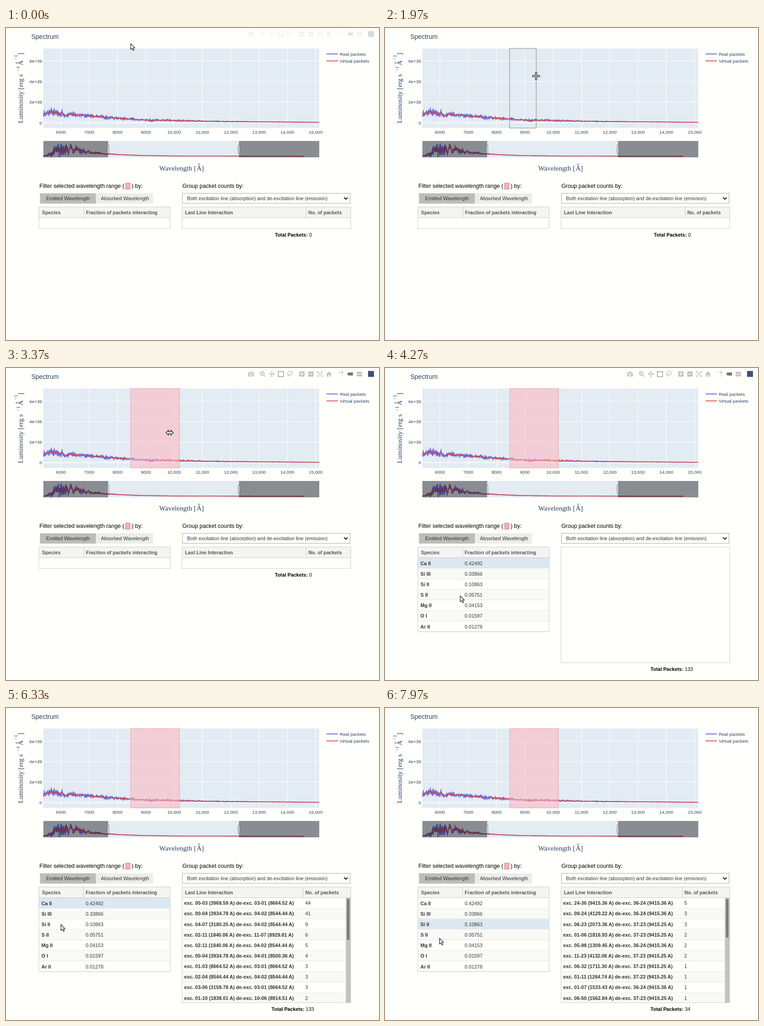
An HTML page for the animation above (8 s loop, 818 px wide and 685 px high).

```html
<!DOCTYPE html>
<html lang="en">
<head>
<meta charset="utf-8">
<title>Spectrum explorer</title>
<style>
  html, body { margin: 0; width: 100%; height: 100%; overflow: hidden; background: #fffffb; }
  svg { display: block; width: 818px; height: 685px; }
  text { font-family: "Liberation Sans", Arial, sans-serif; font-size: 10.75px; fill: #333; white-space: pre; }
  .plot text { font-size: 9.9px; fill: #2a3f5f; }
  .plot .serif { font-family: "Liberation Serif", "Times New Roman", serif; font-size: 15.2px; }
  .plot .sup { font-size: 11px; }
  .b { font-weight: bold; }
  .head { font-weight: bold; fill: #555; }
  .label { font-size: 12.4px; fill: #000; }
  .total { fill: #000; }
</style>
</head>
<body>
<svg viewBox="0 0 818 685" id="stage"></svg>
<script>
const LOOP = 8000;
const stage = document.getElementById('stage');

// ---------- helpers ----------
function el(name, attrs = {}, parent = stage) {
  const node = document.createElementNS('http://www.w3.org/2000/svg', name);
  for (const key in attrs) node.setAttribute(key, attrs[key]);
  parent.appendChild(node);
  return node;
}
const group = (parent = stage, attrs = {}) => el('g', attrs, parent);
const rect = (p, x, y, w, h, fill, more = {}) => el('rect', { x, y, width: w, height: h, fill, ...more }, p);
const path = (p, d, stroke, width = 1, more = {}) =>
  el('path', { d, stroke, 'stroke-width': width, fill: 'none', ...more }, p);
function text(p, x, y, content, cls = '', more = {}) {
  const node = el('text', { x, y, class: cls, ...more }, p);
  node.textContent = content;
  return node;
}
const show = (node, on) => node.setAttribute('display', on ? 'inline' : 'none');
const clamp = v => Math.max(0, Math.min(1, v));
const easeOut = p => 1 - Math.pow(1 - clamp(p), 2.3);
const smooth = p => p * p * (3 - 2 * p);

// Piecewise interpolation through [position, ...values] points.
function along(points, at, ease = p => p) {
  if (at <= points[0][0]) return points[0].slice(1);
  for (let i = 1; i < points.length; i++) {
    const a = points[i - 1], b = points[i];
    if (at <= b[0]) {
      const p = ease((at - a[0]) / (b[0] - a[0]));
      return a.slice(1).map((v, k) => v + (b[k + 1] - v) * p);
    }
  }
  return points[points.length - 1].slice(1);
}

function random(seed) {
  return () => {
    seed = (seed * 1664525 + 1013904223) % 4294967296;
    return seed / 4294967296;
  };
}

// ---------- spectrum plot ----------
const BLUE = '#6663da', RED = '#dc4a4a', PLOT_BG = '#e3ebf3';
const plot = group(stage, { class: 'plot' });
text(plot, 55.5, 24, 'Spectrum', '', { style: 'font-size:14px' });
rect(plot, 82, 45, 605, 174.5, PLOT_BG);

for (let i = 0; i < 10; i++) {
  const x = 120.5 + i * 62.06;
  path(plot, `M${x} 45V219.5`, '#fff');
  const name = 6 + i + (i < 4 ? '000' : ',000');
  text(plot, x, 232, name, '', { 'text-anchor': 'middle' });
}
function yAxis(zero, step) {
  const axis = group(plot);
  ['0', '2e+39', '4e+39', '6e+39'].forEach((name, i) => {
    const y = zero - i * step;
    path(axis, `M82 ${y}H687`, '#fff', i ? 1 : 1.7);
    text(axis, 79, y + 3.6, name, '', { 'text-anchor': 'end' });
  });
  return axis;
}
const axisBefore = yAxis(208, 45.2);
const axisAfter = yAxis(207.6, 44.9);

// Points hold position, level and noise height.
function trace(points, from, to, step, noise, seed, color, width) {
  const rnd = random(seed);
  let d = '';
  for (let x = from; x <= to; x += step) {
    const [y, amp] = along(points, x);
    const jitter = (rnd() + rnd() - 1) * amp * noise;
    d += (d ? 'L' : 'M') + x.toFixed(1) + ' ' + (y + jitter).toFixed(2);
  }
  path(plot, d, color, width, { 'stroke-linejoin': 'round' });
}
const spectrum = [
  [82, 188, 12], [92, 187, 12], [101, 183, 10], [108, 186, 12], [122, 187, 10], [130, 194, 7],
  [140, 189, 7], [160, 191, 6.5], [200, 194.5, 6], [244, 198, 5], [300, 202, 4], [340, 202.7, 4],
  [400, 204, 2.5], [480, 205.3, 1.5], [560, 206, 1], [687, 207, 0.6]
];
trace(spectrum, 82, 687, 0.6, 1, 7, BLUE, 1.5);
trace(spectrum, 82, 687, 1, 0.2, 21, RED, 1.7);

rect(plot, 82, 248, 605, 36, PLOT_BG);
const overview = [
  [82, 281.8, 0], [88, 280, 4], [98, 278, 6], [106, 271, 15], [113, 269, 17], [121, 269, 16],
  [127, 268, 14], [133, 264, 14], [137, 274, 8], [142, 256, 9], [147, 274, 6], [154, 264, 9],
  [161, 268, 8], [170, 270, 8], [176, 274, 5], [181, 271, 5], [190, 275, 4], [200, 273, 3],
  [209, 275.5, 2.5], [222, 277, 1.5], [232, 276.5, 1.5], [246, 278, 1], [300, 280, 0.6],
  [400, 281.2, 0.2], [654, 281.6, 0]
];
trace(overview, 82, 654, 0.5, 1.1, 5, BLUE, 1.5);
trace(overview, 82, 654, 0.8, 0.4, 11, RED, 1.6);
rect(plot, 82, 248, 142, 36, 'rgba(0,0,0,.4)');
rect(plot, 511, 248, 176, 36, 'rgba(0,0,0,.4)');
for (const x of [222.3, 509.3])
  rect(plot, x, 257, 3, 18.5, '#fff', { stroke: '#444', 'stroke-width': 0.9, rx: 0.8 });

text(plot, 336, 313, 'Wavelength [', 'serif');
text(plot, 418, 313, 'A', 'serif');
text(plot, 429, 313, ']', 'serif');
el('circle', { cx: 423.5, cy: 299.8, r: 1.7, stroke: '#2a3f5f', 'stroke-width': 0.8, fill: 'none' }, plot);

const yTitle = group(plot, { transform: 'translate(36.5 209) rotate(-90)' });
text(yTitle, 0, 0, 'Luminosity [erg s', 'serif');
text(yTitle, 113.5, -6.5, '−1', 'serif sup');
text(yTitle, 127, 0, 'A', 'serif');
text(yTitle, 138.5, -11.5, '−1', 'serif sup');
text(yTitle, 149.5, 0, ']', 'serif');
el('circle', { cx: 132.5, cy: -13.2, r: 1.7, stroke: '#2a3f5f', 'stroke-width': 0.8, fill: 'none' }, yTitle);

[['Real packets', BLUE, 57], ['Virtual packets', RED, 72.3]].forEach(([name, color, y]) => {
  path(plot, `M703 ${y}H728`, color, 1.8);
  text(plot, 732, y + 3.5, name);
});

const range = rect(plot, 273.5, 45, 107, 174.3, 'rgba(255,182,193,.56)', { stroke: '#e3a3ac', 'stroke-width': 0.9 });
const dragBase = rect(plot, 273.3, 44.8, 1, 174.9, 'none', { stroke: '#fff' });
const dragBox = rect(plot, 273.3, 44.8, 1, 174.9, 'none', { stroke: '#000', 'stroke-dasharray': '1.7 1.7' });

// ---------- toolbar ----------
const bar = group();
const ICON = '#c3c3c1', ACTIVE = '#747472';
path(bar, 'M531 10h3l1.5-2h4l1.5 2h2.500v8.500h-12.500z', 'none', 1, { fill: ICON });
el('circle', { cx: 537, cy: 14, r: 2.6, fill: ICON, stroke: '#fffffb', 'stroke-width': 1.3 }, bar);
el('circle', { cx: 562, cy: 12, r: 4.2, fill: 'none', stroke: ICON, 'stroke-width': 1.9 }, bar);
path(bar, 'M565 15l4 4M560 12h4M562 10v4', ICON, 1.7);
path(bar, 'M583 7.500v11.500M577.500 13.200h11.500M581 9.500l2-2 2 2M581 17l2 2 2-2M579.500 11l-2 2.200 2 2M587 11l2 2.200-2 2', ICON, 1.5);
rect(bar, 597.3, 7.8, 11.4, 11, 'none', { stroke: ACTIVE, 'stroke-width': 1.7, 'stroke-dasharray': '1.9 1.3' });
el('ellipse', { cx: 622.8, cy: 11.3, rx: 5.6, ry: 3.9, fill: 'none', stroke: ICON, 'stroke-width': 1.5, transform: 'rotate(-15 622.8 11.3)' }, bar);
path(bar, 'M618.500 14q-1 2 1 2.200t1 3', ICON, 1.3);
for (const x of [649, 668.7]) {
  rect(bar, x - 5.8, 7.5, 11.6, 11.5, ICON, { rx: 0.8 });
  path(bar, `M${x - 3.2} 13.200h6.400` + (x < 650 ? `M${x} 10v6.400` : ''), '#fffffb', 1.8);
}
path(bar, 'M682.800 11V7.800h3.200M691 7.800h3.200V11M694.200 15.500v3.200H691M686 18.700h-3.200v-3.200M684.500 9.500l8 7.500M692.500 9.500l-8 7.500', ICON, 1.5);
path(bar, 'M702 13.500l6.300-6 6.300 6h-1.600v5.500h-3.400v-4h-2.600v4h-3.400v-5.500z', 'none', 1, { fill: ICON });
path(bar, 'M728.500 9.300h8M737.500 11v8', ICON, 1.7, { 'stroke-dasharray': '2 1.300' });
rect(bar, 735.5, 7.6, 3.5, 3.4, ICON);
path(bar, 'M748 13.200l3-3.400h10v6.800h-10z', 'none', 1, { fill: ACTIVE });
for (const y of [8.3, 14])
  path(bar, `M768 ${y + 2.2}l2-2.200h11v4.400h-11z`, 'none', 1, { fill: ICON });
rect(bar, 794, 6.5, 13, 13, '#3f4f75', { rx: 0.8 });

// ---------- controls ----------
text(stage, 73.3, 351, 'Filter selected wavelength range (', 'label');
rect(stage, 262.5, 340.5, 9.5, 13.5, '#f5b1b7', { stroke: '#c9777d' });
text(stage, 275.5, 351, ') by:', 'label');
text(stage, 386.7, 351, 'Group packet counts by:', 'label');
rect(stage, 74, 363, 123, 22.5, '#bcbcb9');
rect(stage, 74, 363, 1, 22.5, '#d8d8d5');
rect(stage, 197, 363, 125.7, 22.5, '#ececea');
text(stage, 136, 378.2, 'Emitted Wavelength', '', { 'text-anchor': 'middle' });
text(stage, 261, 378.2, 'Absorbed Wavelength', '', { 'text-anchor': 'middle' });
rect(stage, 387, 363, 367.5, 22, '#fffffc', { stroke: '#a2a2a0' });
text(stage, 397.3, 378.2, 'Both excitation line (absorption) and de-excitation line (emission)');
path(stage, 'M741.300 372l4 4 4-4', '#111', 1.9);

// ---------- tables ----------
const ROW = 23.15, TOP = 417;
const frame = (p, x, w, h) => rect(p, x, 393, w, h, 'none', { stroke: '#cbcbc8' });
function header(p, x, w, split, first, second, firstX) {
  rect(p, x, 393, w, 23.5, '#f4f4f2');
  path(p, `M${x} 416.500h${w}M${split} 393v23.500`, '#cbcbc8');
  text(p, firstX, 408.5, first, 'head');
  text(p, split + 4.6, 408.5, second, 'head');
}
function rowBands(p, x, w, count) {
  for (let i = 0; i < count; i++) {
    const y = TOP + i * ROW;
    if (i % 2) rect(p, x, y, w, ROW, '#f9f9f6');
    path(p, `M${x} ${y + ROW - 0.5}h${w}`, '#e2e2df', 0.9);
  }
}

const leftEmpty = group();
header(leftEmpty, 72, 288, 171, 'Species', 'Fraction of packets interacting', 79);
frame(leftEmpty, 72, 288, 47);
const leftBlank = group();
frame(leftBlank, 72, 288, 186);

const leftRows = group();
header(leftRows, 72, 288, 170.2, 'Species', 'Fraction of packets interacting', 79);
rowBands(leftRows, 72, 288, 7);
const picked = rect(leftRows, 72.5, TOP, 287, ROW - 0.6, '#dce8f1');
const species = ['Ca II 0.42492', 'Si III 0.33866', 'Si II 0.10863', 'S II 0.05751', 'Mg II 0.04153', 'O I 0.01597', 'Ar II 0.01278'];
species.forEach((line, i) => {
  const cut = line.lastIndexOf(' '), y = 432.6 + i * ROW;
  text(leftRows, 77.8, y, line.slice(0, cut), 'b');
  text(leftRows, 174.8, y, line.slice(cut + 1));
});
frame(leftRows, 72, 288, 186);

const rightEmpty = group();
header(rightEmpty, 386, 370, 658.3, 'Last Line Interaction', 'No. of packets', 392.5);
frame(rightEmpty, 386, 370, 47);
const rightBlank = group();
frame(rightBlank, 386, 370, 254);

const clip = el('clipPath', { id: 'body' });
rect(clip, 386, 393, 370, 254, '#000');
function lineTable(lines, thumb) {
  const outer = group(), table = group(outer, { 'clip-path': 'url(#body)' });
  header(table, 386, 370, 651.8, 'Last Line Interaction', 'No. of packets', 392.5);
  rowBands(table, 386, 359, 10);
  lines.forEach((line, i) => {
    const [up, upWave, down, downWave, count] = line.split(' ');
    const y = 432.2 + i * ROW;
    text(table, 390.8, y, `exc. ${up} (${upWave} A) de-exc. ${down} (${downWave} A)`, 'b');
    text(table, 656.3, y, count);
  });
  rect(table, 745.3, 416.5, 10.5, 231, '#c2c2bf');
  rect(table, 747.6, 419, 5.6, thumb, '#7b7b79', { rx: 2.6 });
  frame(outer, 386, 370, 254);
  return outer;
}
const calcium = lineTable([
  '00-03 3969.59 03-01 8664.52 44', '00-04 3934.78 04-02 8544.44 41',
  '04-07 3180.25 04-02 8544.44 9', '02-11 1840.06 11-07 8929.81 6',
  '02-11 1840.06 04-02 8544.44 5', '00-04 3934.78 04-01 8500.36 4',
  '01-03 8664.52 03-01 8664.52 3', '02-04 8544.44 04-02 8544.44 3',
  '03-06 3159.78 03-01 8664.52 3', '01-10 1838.01 10-06 8914.51 2'
], 90);
const silicon = lineTable([
  '24-36 9415.36 36-24 9415.36 5', '09-24 4129.22 36-24 9415.36 3',
  '06-23 2073.36 37-23 9415.25 3', '01-06 1816.93 37-23 9415.25 2',
  '05-98 1309.45 36-24 9415.36 2', '11-23 4132.06 37-23 9415.25 2',
  '06-32 1711.30 37-23 9415.25 1', '01-11 1264.74 37-23 9415.25 1',
  '01-07 1533.43 36-24 9415.36 1', '06-50 1562.84 37-23 9415.25 1'
], 85);

const total = group();
text(total, 0, 0, 'Total Packets:', 'b total');
const totalValue = text(total, 75.3, 0, '0', 'total');

// ---------- cursors ----------
const arrow = group();
path(arrow, 'M.500 .500V13.300l3-2.700 2.200 5 2.200-1-2.200-4.800h4z', '#111', 1.1, { fill: '#fff', 'stroke-linejoin': 'round' });
const cross = group();
for (let i = 0; i < 4; i++)
  rect(cross, -1.6, -8, 3.2, 5.4, '#fff', { stroke: '#111', 'stroke-width': 1.2, rx: 0.9, transform: `rotate(${i * 90})` });
const resize = group();
path(resize, 'M-8 0l5.500-5.500v3.500h5v-3.500l5.500 5.500-5.500 5.500v-3.500h-5v3.500z', '#111', 1.2, { fill: '#fff', 'stroke-linejoin': 'round' });

const pointerPath = [
  [20, 273, 34], [250, 273, 5], [500, 273, 4], [530, 273, 1.5], [900, 273, 92],
  [1090, 273, 92], [1330, 273, 98], [1600, 273, 98], [2300, 380, 112], [3270, 380, 112],
  [3370, 359, 142], [3500, 262, 323], [3900, 262, 323], [4270, 164.5, 500], [5300, 164.5, 500],
  [6130, 119.5, 465], [6210, 119.5, 465], [6330, 120, 475], [7740, 120, 475], [7970, 119, 505]
];

function barOpacity(t) {
  if (t < 500) return 0.2 * clamp(1 - t / 260);
  if (t < 1610) return easeOut((t - 530) / 300);
  if (t < 2440) return 1 - easeOut((t - 1610) / 300);
  if (t < 4610) return easeOut((t - 2440) / 300);
  return 1 - easeOut((t - 4610) / 290);
}

function render(t) {
  const [x, y] = along(pointerPath, t, smooth);
  const shape = t < 3070 ? (y > 45 ? cross : arrow) : t < 3930 ? resize : arrow;
  for (const cursor of [arrow, cross, resize]) show(cursor, cursor === shape);
  shape.setAttribute('transform', `translate(${x.toFixed(2)} ${y.toFixed(2)})`);

  bar.setAttribute('opacity', barOpacity(t).toFixed(3));

  const selected = t >= 3070;
  show(axisBefore, !selected);
  show(axisAfter, selected);
  show(range, selected);
  for (const box of [dragBase, dragBox]) {
    show(box, t >= 1630 && !selected);
    box.setAttribute('width', Math.max(0, x - 273).toFixed(2));
  }

  const filtered = t >= 3430;
  const left = !filtered ? leftEmpty : t < 3930 ? leftBlank : leftRows;
  for (const table of [leftEmpty, leftBlank, leftRows]) show(table, table === left);
  picked.setAttribute('y', TOP + (t < 7400 ? 0 : 2 * ROW));

  const right = !filtered ? rightEmpty
    : t < 4630 ? rightBlank
    : t < 7400 ? calcium
    : t < 7770 ? rightBlank : silicon;
  for (const table of [rightEmpty, rightBlank, calcium, silicon]) show(table, table === right);

  total.setAttribute('transform', filtered ? 'translate(582.3 664.600)' : 'translate(589.5 457.500)');
  totalValue.textContent = !filtered ? '0' : t < 7770 ? '133' : '34';
}

const start = performance.now();
function tick() {
  render((performance.now() - start) % LOOP);
  requestAnimationFrame(tick);
}
render(0);
requestAnimationFrame(tick);
</script>
</body>
</html>
```
